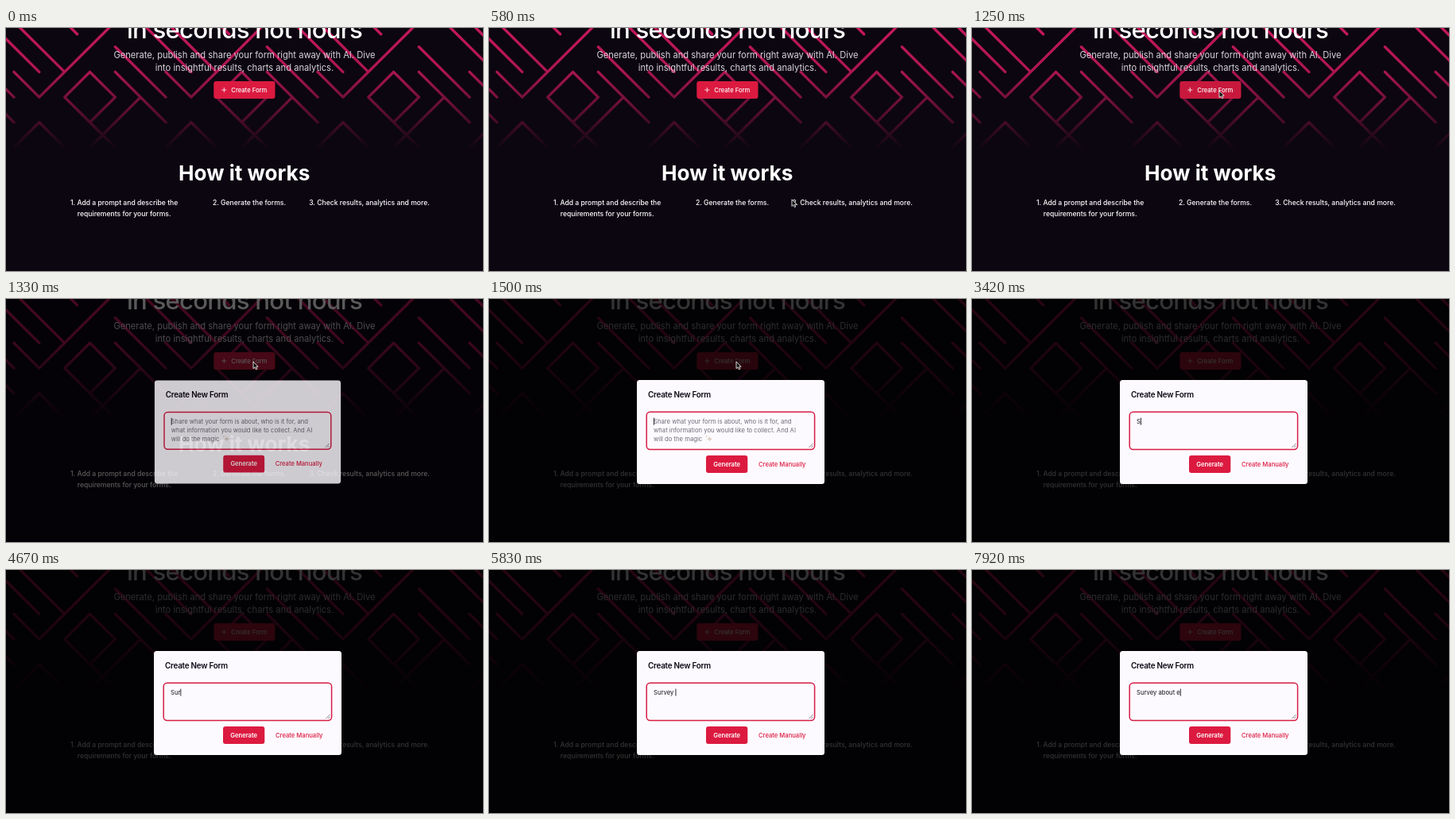
Animation, 600 px wide and 306 px high, one loop 8000 ms. Source, as an HTML page:

```html
<!DOCTYPE html>
<html lang="en">
<head>
<meta charset="utf-8">
<title>Create a form</title>
<style>
  html, body { margin: 0; width: 100%; height: 100%; overflow: hidden; background: #0c0611; }
  svg { display: block; width: 600px; height: 306px; }
  text { font-family: Inter, "Liberation Sans", sans-serif; fill: #fff; white-space: pre; }
  .mid { text-anchor: middle; }
  .hero { font-size: 31.2px; font-weight: 500; letter-spacing: -0.025em; }
  .sub { font-size: 11.15px; fill: #d9d5dd; }
  .how { font-size: 26.2px; font-weight: 700; }
  .step { font-size: 8.6px; font-weight: 500; }
  .btn { font-size: 7.65px; font-weight: 500; }
  .title { font-size: 9.9px; font-weight: 600; letter-spacing: -0.025em; fill: #0c0611; }
  .field { font-size: 7.7px; fill: #16111c; }
  .hint { fill: #716c78; }
  .red { fill: #dc1a40; }
</style>
</head>
<body>
<svg viewBox="0 0 600 306">
  <defs>
    <linearGradient id="fade" x1="0" y1="0" x2="0" y2="1">
      <stop offset="0" stop-color="#0c0611" stop-opacity="0"/>
      <stop offset=".35" stop-color="#0c0611" stop-opacity=".12"/>
      <stop offset="1" stop-color="#0c0611"/>
    </linearGradient>
  </defs>

  <rect width="600" height="306" fill="#0c0611"/>
  <path id="maze" fill="none" stroke="#c4185a" stroke-width="3.4" stroke-linejoin="round" stroke-linecap="round"/>
  <rect width="600" height="153" fill="url(#fade)"/>
  <rect y="152" width="600" height="20" fill="#0c0611"/>

  <text class="hero mid" x="300" y="13">in seconds not hours</text>
  <text class="sub mid" x="300" y="38.3">Generate, publish and share your form right away with AI. Dive</text>
  <text class="sub mid" x="300" y="54">into insightful results, charts and analytics.</text>
  <rect id="create" x="261.3" y="67" width="77.2" height="22" rx="3" fill="#dc1a40"/>
  <path d="M271.3 78h6M274.3 75v6" stroke="#fff" stroke-width=".8"/>
  <text class="btn" x="283.3" y="80.7">Create Form</text>

  <text class="how mid" x="299.7" y="191.6">How it works</text>
  <text class="step mid" x="148.7" y="223.4">1. Add a prompt and describe the</text>
  <text class="step mid" x="148.7" y="237">requirements for your forms.</text>
  <text class="step mid" x="306" y="223.4">2. Generate the forms.</text>
  <text class="step mid" x="457" y="223.4">3. Check results, analytics and more.</text>

  <rect id="shade" width="600" height="306" fill="#000"/>

  <g id="modal">
    <rect x="186" y="102" width="236" height="131" rx="3.5" fill="#fdfaff"/>
    <text class="title" x="200" y="124">Create New Form</text>
    <rect x="198.2" y="142.2" width="211.4" height="47.3" rx="4.5" fill="#fdfaff" stroke="#d61d45" stroke-width="1.5"/>
    <path d="M402.5 187l5-5M405.3 187l2.2-2.2" stroke="#55505c" stroke-width=".7"/>
    <g id="hint">
      <text class="field hint" x="207" y="156.9">Share what your form is about, who is it for, and</text>
      <text class="field hint" x="207" y="167.9">what information you would like to collect. And AI</text>
      <text class="field hint" x="207" y="178.9">will do the magic</text>
      <path fill="#dccfc4" d="M277.5 172.5q.5 3.3 3.6 3.8q-3.100.5-3.600 3.800q-.5-3.300-3.600-3.800q3.100-.5 3.600-3.800M273.800 171.500q.2 1.400 1.500 1.600q-1.300.2-1.500 1.600q-.2-1.400-1.500-1.600q1.300-.2 1.500-1.600"/>
    </g>
    <text id="typed" class="field" x="207" y="156.9"></text>
    <rect id="caret" y="149.6" width=".9" height="9" fill="#16111c"/>
    <rect x="273" y="197" width="52.300" height="22" rx="3" fill="#dc1a40"/>
    <text class="btn mid" x="299.200" y="210.800" style="font-weight:600">Generate</text>
    <text class="btn red" x="339" y="210.800">Create Manually</text>
  </g>

  <path id="arrow" d="M0 0V8.600L2 6.800L3.400 9.800L4.900 9.100L3.600 6.200H6.200Z" fill="#111" stroke="#fff" stroke-width=".8" stroke-linejoin="round"/>
  <path id="beam" d="M-2-5Q0-5 0-3.500Q0-5 2-5M0-3.500V3.500M-2 5Q0 5 0 3.500Q0 5 2 5M-1 1.500H1" fill="none" stroke="#222" stroke-width=".8"/>
</svg>
<script>
const LOOP = 8000, OPEN = 1330, FIRST_KEY = 3420;
const $ = id => document.getElementById(id);
const show = (el, on) => el.setAttribute("visibility", on ? "inherit" : "hidden");

// One maze tile, 12 units wide; each row is a polyline of x,y pairs.
const tile = [
  [0, 10, 2, 8, 4, 10],
  [4, 6, 6, 4, 8, 6, 6, 8, 4, 6],
  [6, 10, 10, 6],
  [6, 8, 8, 10],
  [8, 4, 12, 8],
  [2, 6, 8, 0],
  [0, 4, 2, 6],
  [-2, 6, 0, 8],
  [0, 0, 4, 4],
  [8, 2, 12, 6],
  [10, 0, 14, 4],
  [4, 0, 5, 1]
];
let d = "";
for (let shift = -12; shift <= 36; shift += 12) {
  for (const line of tile) {
    for (let i = 0; i < line.length; i += 2) {
      const x = 10 + 15.92 * (line[i] + shift), y = -8 + 15.85 * line[i + 1];
      d += `${i ? "L" : "M"}${x.toFixed(1)} ${y.toFixed(1)}`;
    }
  }
}
$("maze").setAttribute("d", d);

const message = "Survey about e";
const keyTimes = [3420, 3580, 4500, 4750, 5080, 5330, 5580, 5920, 6080, 6500, 6920, 7170, 7500, 7830];

// time, x, y of the pointer
const path = [
  [250, 430, 312], [1000, 311, 79], [1670, 311, 79],
  [1800, 312, 122], [2350, 314.5, 161], [3420, 314.5, 161]
];

function pointerAt(t) {
  let i = 1;
  while (i < path.length - 1 && t > path[i][0]) i++;
  const [t0, x0, y0] = path[i - 1], [t1, x1, y1] = path[i];
  const p = Math.min(1, Math.max(0, (t - t0) / (t1 - t0)));
  const e = p * p * (3 - 2 * p);
  return [x0 + (x1 - x0) * e, y0 + (y1 - y0) * e];
}

function draw(t) {
  const fade = t < OPEN ? 0 : t < 1420 ? 0.81 : t < 1500 ? 0.97 : 1;
  const scale = 0.96 + 0.04 * fade;
  $("shade").setAttribute("opacity", 0.8 * fade);
  $("modal").setAttribute("opacity", fade);
  $("modal").setAttribute("transform", `translate(304 167.5) scale(${scale}) translate(-304 -167.5)`);

  const count = keyTimes.filter(k => k <= t).length;
  $("typed").textContent = message.slice(0, count);
  show($("hint"), !count);
  const since = t - (count ? keyTimes[count - 1] : OPEN);
  const width = count ? $("typed").getComputedTextLength() : 0;
  $("caret").setAttribute("x", 207 + width);
  show($("caret"), since % 1000 < 500);

  const [x, y] = pointerAt(t);
  const inField = t > OPEN && y > 142;
  for (const id of ["arrow", "beam"]) $(id).setAttribute("transform", `translate(${x} ${y})`);
  show($("arrow"), t > path[0][0] && t < FIRST_KEY && !inField);
  show($("beam"), t < FIRST_KEY && inField);
  const hover = t < 1750 && x < 338 && y > 67 && y < 89;
  $("create").setAttribute("fill", hover ? "#c8193d" : "#dc1a40");
}

const start = performance.now();
function tick() {
  draw((performance.now() - start) % LOOP);
  requestAnimationFrame(tick);
}
tick();
</script>
</body>
</html>
```
